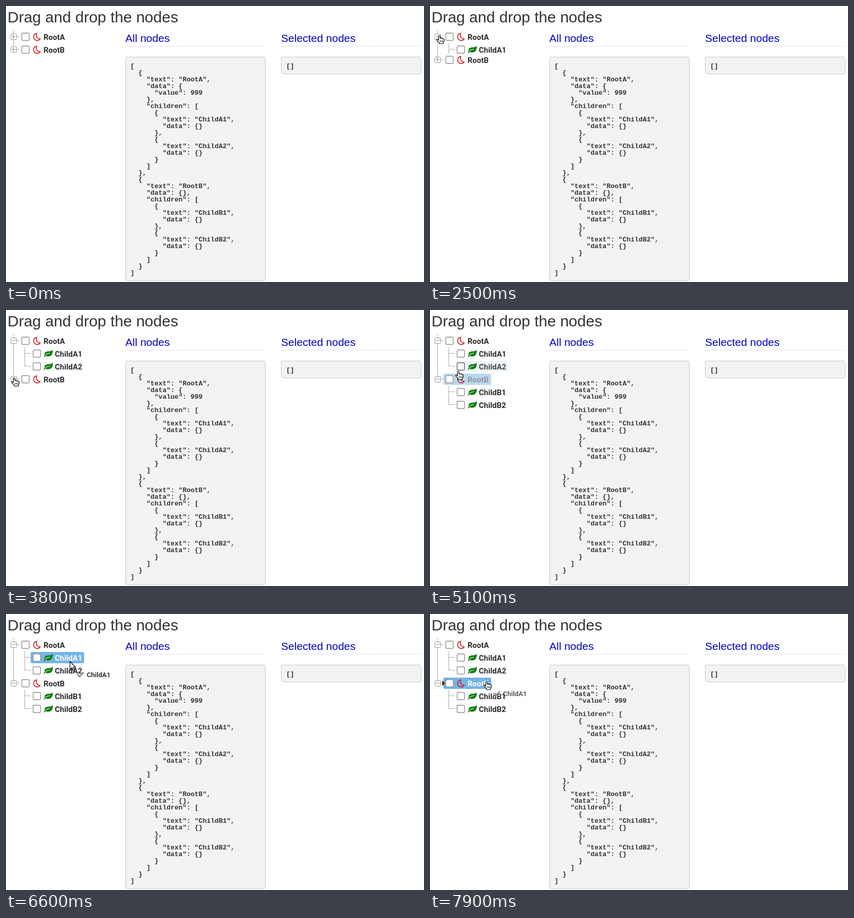
Write an HTML page with a canvas that moves like this. It is 813 px wide and 538 px high and loops after 8 s.

```html
<!DOCTYPE html>
<html lang="en">
<head>
<meta charset="utf-8">
<title>Drag and drop the nodes</title>
<style>
  html, body { margin: 0; width: 100%; height: 100%; overflow: hidden; background: #fff; }
  canvas { display: block; }
</style>
</head>
<body>
<canvas id="stage" width="813" height="538"></canvas>
<script>
const ctx = document.getElementById('stage').getContext('2d');
const LOOP = 8000;
const SANS = '"Liberation Sans", Arial, sans-serif';
const MONO = 'bold 13px "Liberation Mono", monospace';
const TREE = 'Roboto, sans-serif';

const node = (text, kids, data = {}) =>
  kids ? { text, data, children: kids } : { text, data };
const nodes = [
  node('RootA', [node('ChildA1'), node('ChildA2')], { value: 999 }),
  node('RootB', [node('ChildB1'), node('ChildB2')])
];
const json = JSON.stringify(nodes, null, 2).split('\n');

const moon = new Path2D('M8 1.2A7 7 0 1 0 14.6 12A7.2 7.2 0 0 1 8 1.2z');
const leaf = new Path2D('M17.5 .5C18.8 6 17 13.5 9 13.5C7 13.5 5 13 3.8 12.2L1.6 15L.2 14L2.4 11.3C.6 5.5 6 3.7 10 3.6C13.5 3.5 15.8 3 17.5 .5z');
const vein = new Path2D('M3.8 10.9Q7 7.4 12.5 7.2');
const tick = new Path2D('M0 6.5L2.5 4L6 7.3L12.7 .6L15.2 3.1L6 12.2z');
const arrow = new Path2D('M.5 .5V16.2L4.2 12.8L6.9 19L9.4 17.9L6.7 11.9H11.6z');
const hand = new Path2D('M4.5 9.5V2Q4.5 .5 6 .5T7.5 2V6Q8 5 9.3 5.2T10.5 6.4Q11 5.6 12 5.9T13.2 7.2Q14 6.6 14.8 7.2T15.5 8.5V11.5L13.8 14V16.5H6V14.6L1 9.6Q.3 8.4 1.4 7.8T3.2 8.2z');

// Pointer: time, x, y, shape
const pointer = [
  [800, 48, 10, arrow], [900, 40, 23, arrow], [1000, 31, 37, arrow],
  [1200, 22, 46, arrow], [1300, 14, 56, hand], [1600, 12, 57, hand],
  [3000, 16, 66, arrow], [3100, 16, 81, arrow], [3200, 16, 98, arrow],
  [3300, 16, 114, arrow], [3400, 12, 127, hand], [3600, 12, 132, hand],
  [3800, 10, 132, hand], [4900, 11, 132, hand],
  [5100, 49, 119, hand], [5200, 66, 112, hand], [5300, 82, 104, hand],
  [5400, 97, 96, hand], [5500, 110, 89, hand], [5600, 120, 83, hand],
  [5700, 123, 81, hand], [6300, 125, 82, hand],
  [6600, 124, 92, arrow], [6700, 123, 100, arrow], [6800, 120, 108, arrow],
  [6900, 118, 115, arrow], [7000, 113, 124, arrow], [7100, 104, 131, hand]
];

// Highlight strength per node: time, value
const hover = {
  RootB: [[5100, .5], [5200, 0], [7000, .5], [7100, 1]],
  ChildA1: [[5400, .2], [5500, .8], [5600, 1], [6700, .5], [6800, 0]],
  ChildA2: [[5100, .12], [5200, .7], [5300, 1], [5400, .8], [5500, .2], [5600, 0],
            [6700, .5], [6800, 1], [7000, .5], [7100, 0]]
};

// Height of the unfolded children: time, value
const unfold = [
  [[2500, 20], [2600, 47], [3000, 50]],
  [[4300, 20], [4400, 50]]
];

// Drop marker: time, x, y
const marker = [[6800, 42, 121], [7000, 24, 135]];

const at = (steps, t) => steps.filter(s => s[0] <= t).pop();
const value = (steps, t) => steps && at(steps, t) ? at(steps, t)[1] : 0;

function text(str, x, y, font, color) {
  ctx.font = font;
  ctx.fillStyle = color;
  ctx.fillText(str, x, y);
}

function box(x, y, w, h, r, fill, stroke, width = 1) {
  ctx.beginPath();
  ctx.roundRect(x, y, w, h, r);
  ctx.fillStyle = fill;
  ctx.fill();
  if (!stroke) return;
  ctx.strokeStyle = stroke;
  ctx.lineWidth = width;
  ctx.stroke();
}

function line(x1, y1, x2, y2, color = '#a6a6a6') {
  ctx.beginPath();
  ctx.moveTo(x1, y1);
  ctx.lineTo(x2, y2);
  ctx.strokeStyle = color;
  ctx.lineWidth = 1;
  ctx.stroke();
}

function shape(path, x, y, fill, stroke, width = 1) {
  ctx.save();
  ctx.translate(x, y);
  ctx.lineJoin = 'round';
  if (fill) { ctx.fillStyle = fill; ctx.fill(path); }
  if (stroke) { ctx.strokeStyle = stroke; ctx.lineWidth = width; ctx.stroke(path); }
  ctx.restore();
}

function panel(title, x, h, lines) {
  text(title, x, 70, '21px ' + SANS, '#0000c8');
  line(x, 78.5, x + 273, 78.5, '#e5e5e5');
  box(x + .5, 99.5, 272, h, 3.5, '#f3f3f3', '#c8c8c8');
  lines.forEach((s, i) => text(s, x + 10, 121 + 13 * i, MONO, '#333'));
}

function item(name, x, c, t) {
  const k = value(hover[name], t);
  const root = name.startsWith('Root');
  if (k) {
    ctx.globalAlpha = k;
    box(x, c - 11, root ? 93 : 104, 22, 3, '#74b4e8');
    ctx.globalAlpha = 1;
  }
  box(x + 4.7, c - 7.3, 14.6, 14.6, 3, '#fff', k && k < .5 ? '#666' : '#929292', 1.4);
  if (root) {
    shape(moon, x + 26, c - 8, null, '#d71920', 1.6);
  } else {
    shape(leaf, x + 25, c - 8, '#0a7f0a');
    shape(vein, x + 25, c - 8, null, '#fff', 1.1);
  }
  const g = Math.round(45 + 210 * k);
  text(name, x + 47, c + 6, 'bold 15px ' + TREE, `rgb(${g},${g},${g})`);
}

function expander(c, open) {
  line(20, c - .5, 26, c - .5);
  box(9.5, c - 5.5, 11, 11, 1.5, '#fff', '#999');
  line(11.5, c - .5, 18.5, c - .5, '#888');
  if (!open) line(14.5, c - 4, 14.5, c + 4, '#888');
}

function children(kids, c, h, t) {
  ctx.save();
  ctx.beginPath();
  ctx.rect(0, c + 13, 230, h);
  ctx.clip();
  line(36.5, c + 13, 36.5, c + 50);
  kids.forEach((kid, i) => {
    const y = c + 25 * (i + 1);
    line(36, y - .5, 48, y - .5);
    item(kid.text, 48, y, t);
  });
  ctx.restore();
}

function tree(t) {
  const open = unfold.map(steps => value(steps, t));
  const rows = [60, 85 + open[0]];
  line(14.5, 48, 14.5, rows[1]);
  nodes.forEach((n, i) => {
    expander(rows[i], open[i] > 0);
    item(n.text, 26, rows[i], t);
    if (open[i]) children(n.children, rows[i], open[i], t);
  });
}

function dragging(t, x, y, isHand) {
  const m = at(marker, t);
  if (m) shape(new Path2D('M0 -5.5L5 0L0 5.5z'), m[1], m[2], '#222');
  const left = x + (isHand ? 18 : 13);
  const mid = y + (isHand ? 24 : 26);
  ctx.globalAlpha = t >= 7900 ? .8 : 1;
  shape(tick, left, mid - 6, '#999');
  text('ChildA1', left + 20, mid + 5, 'bold 13px ' + TREE, '#333');
  ctx.globalAlpha = 1;
}

function draw(t) {
  ctx.fillStyle = '#fff';
  ctx.fillRect(0, 0, 813, 538);
  text('Drag and drop the nodes', 3, 32, '30px ' + SANS, '#333');
  panel('All nodes', 232, 436, json);
  panel('Selected nodes', 535, 33, ['[]']);
  tree(t);
  const p = at(pointer, t);
  if (!p) return;
  const [, x, y, look] = p;
  if (t >= 6600) dragging(t, x, y, look === hand);
  shape(look, x, y, '#fff', '#000', 1.2);
  if (look === hand) for (const dx of [7.8, 10.3, 12.8]) line(x + dx, y + 10, x + dx, y + 13.5, '#000');
}

function tick60(now) {
  draw(now % LOOP);
  requestAnimationFrame(tick60);
}
requestAnimationFrame(tick60);
</script>
</body>
</html>
```
